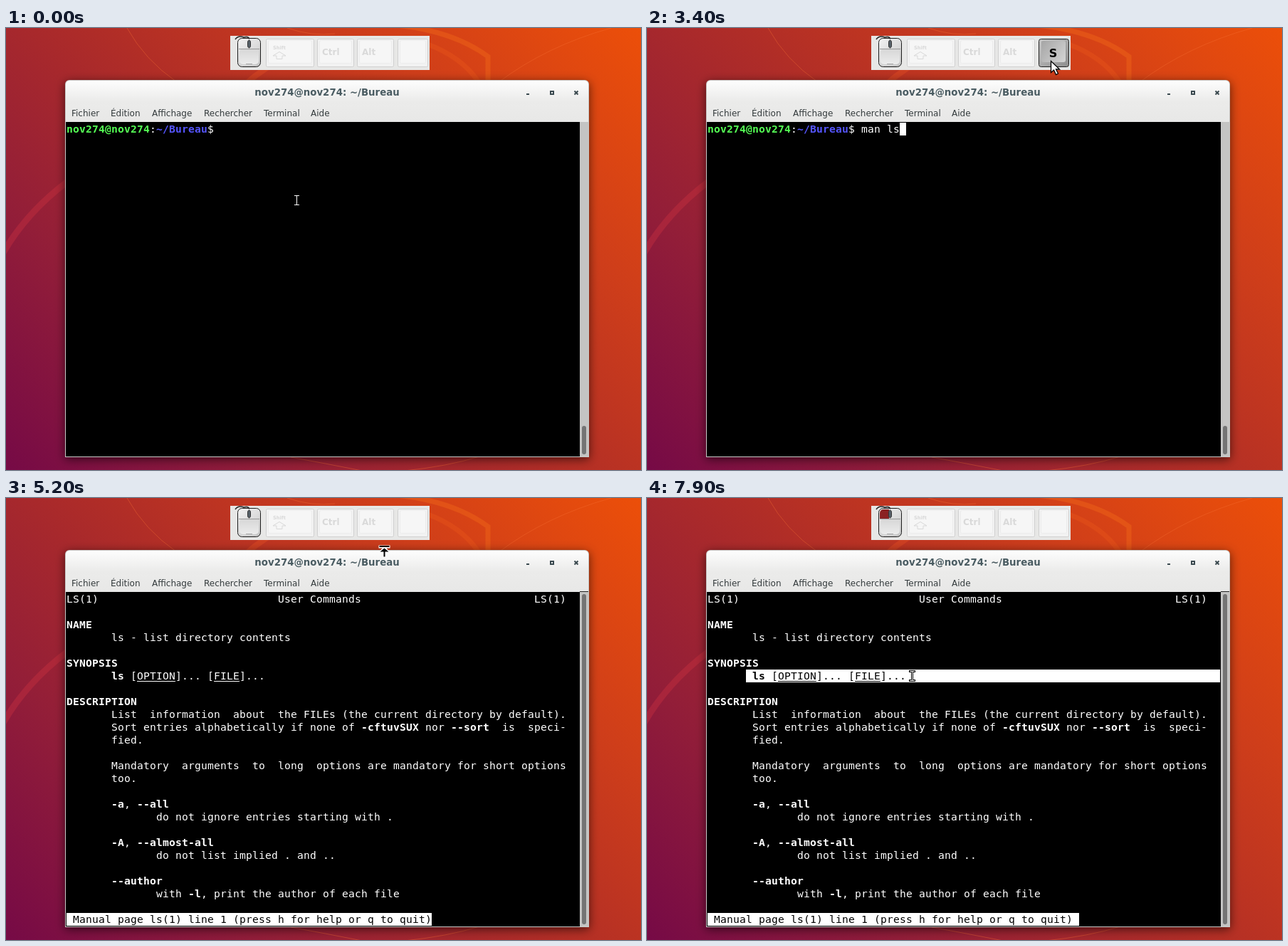
Recreate the animation shown at these times as an HTML page with a canvas. Size 892 px wide and 621 px high, loop 8 s.

```html
<!DOCTYPE html>
<html lang="fr">
<head>
<meta charset="utf-8">
<title>Terminal</title>
<style>
  html, body { margin: 0; width: 100%; height: 100%; overflow: hidden; }
  canvas { display: block; }
</style>
</head>
<body>
<canvas id="stage" width="892" height="621"></canvas>
<script>
const ctx = document.getElementById('stage').getContext('2d');
const LOOP = 8000, STEP = 100;
const SANS = '"DejaVu Sans", sans-serif', MONO = '"DejaVu Sans Mono", monospace';
const USER = 'nov274';
const LEFT = 85, TOP = 133, CELL_W = 9, CELL_H = 18;

// *bold* and _underlined_
const PAGE = `LS(1)${' '.repeat(28)}User Commands${' '.repeat(27)}LS(1)

*NAME*
       ls - list directory contents

*SYNOPSIS*
       *ls* [_OPTION_]... [_FILE_]...

*DESCRIPTION*
       List  information  about  the FILEs (the current directory by default).
       Sort entries alphabetically if none of *-cftuvSUX* nor *--sort*  is  speci-
       fied.

       Mandatory  arguments  to  long  options are mandatory for short options
       too.

       *-a*, *--all*
              do not ignore entries starting with .

       *-A*, *--almost-all*
              do not list implied . and ..

       *--author*
              with *-l*, print the author of each file`.split('\n');
const STATUS = ' Manual page ls(1) line 1 (press h for help or q to quit)';

// [time, value]: each value holds until the next entry
const KEYS = [[0, ''], [1700, 'M'], [1800, 'A'], [2000, 'N'], [2300, 'Space'], [2900, ''],
  [3200, 'L'], [3400, 'S'], [4100, 'Enter'], [4700, '']];
const TYPED = [[0, ''], [1700, 'm'], [1800, 'ma'], [2100, 'man'], [2300, 'man '],
  [3200, 'man l'], [3400, 'man ls']];
const CARET = [[0, 0], [400, 1], [1000, 0], [1600, 1], [2900, 0], [3200, 1], [4000, 0], [4100, 1],
  [4700, 0], [5300, 1], [5900, 0], [6500, 1], [7200, 0], [7800, 1]];
// [time, x, y], linear in between
const POINTER = [[600, 408, 242], [700, 470, 200], [800, 598, 110], [900, 585, 57], [1000, 567, 46],
  [4900, 567, 46], [5200, 531, 69], [5300, 516, 95], [5600, 302, 265], [5800, 346, 310],
  [6100, 338, 282], [6300, 338, 282], [6600, 176, 250], [6700, 161, 247], [6800, 161, 247],
  [6900, 138, 249], [7400, 138, 249], [7500, 155, 249], [7800, 340, 250], [7900, 372, 250]];

const valueAt = (list, t) => list.filter(e => e[0] <= t).pop()[1];

function pointerAt(t) {
  const i = POINTER.findIndex(p => p[0] > t);
  if (i <= 0) return POINTER[i < 0 ? POINTER.length - 1 : 0].slice(1);
  const [t0, x0, y0] = POINTER[i - 1], [t1, x1, y1] = POINTER[i];
  const k = (t - t0) / (t1 - t0);
  return [Math.round(x0 + (x1 - x0) * k), Math.round(y0 + (y1 - y0) * k)];
}

function rect(x, y, w, h, color) {
  ctx.fillStyle = color;
  ctx.fillRect(x, y, w, h);
}

function box(x, y, w, h, r, fill, stroke) {
  ctx.beginPath();
  ctx.roundRect(x, y, w, h, r);
  paint(fill, stroke);
}

function shape(d, fill, stroke, width = 1) {
  paint(fill, stroke, width, new Path2D(d));
}

function paint(fill, stroke, width = 1, path) {
  ctx.lineWidth = width;
  if (fill) { ctx.fillStyle = fill; path ? ctx.fill(path) : ctx.fill(); }
  if (stroke) { ctx.strokeStyle = stroke; path ? ctx.stroke(path) : ctx.stroke(); }
}

function label(text, x, y, font, color, align = 'left') {
  ctx.font = font;
  ctx.fillStyle = color;
  ctx.textAlign = align;
  ctx.fillText(text, x, y);
}

function gradient(x0, y0, x1, y1, ...stops) {
  const g = ctx.createLinearGradient(x0, y0, x1, y1);
  stops.forEach((c, i) => g.addColorStop(i / (stops.length - 1), c));
  return g;
}

function wallpaper() {
  rect(0, 0, 892, 621, gradient(68, 688, 824, -68, '#760a46', '#931e38', '#b02d27', '#cf3e1a', '#ec4f09'));
  shape('M-4 316Q28 260 86 216', null, 'rgba(215,55,65,.32)', 9);
  shape('M335 80Q362 55 400 38', null, 'rgba(235,85,35,.35)', 8);
  shape('M520 -6Q620 -2 677 40V76', null, 'rgba(240,105,25,.42)', 7);
  shape('M590 22Q640 40 664 76', null, 'rgba(240,95,25,.28)', 7);
  shape('M170 0Q195 45 240 76M395 0Q430 12 462 8M692 76Q760 25 850 0M400 603Q450 612 500 622M560 622Q620 616 665 602',
    null, 'rgba(245,110,50,.4)');
}

function key(x, w, pressed) {
  if (pressed) {
    box(x + .5, 15.5, w, 39, 3, gradient(x, 15, x + w, 55, '#c6c6c6', '#8e8e8e'), '#222');
    box(x + 4, 18, w - 8, 30, 3, gradient(x, 18, x + w, 48, '#a2a2a2', '#d8d8d8'));
  } else {
    box(x + .5, 15.5, w, 39, 2, '#f2f2f2', '#d0d0d0');
    box(x + 3.5, 17.5, w - 6, 32, 2, '#f6f6f6', '#ececec');
  }
}

function keyPanel(name, mouseDown) {
  const wide = name.length > 1, faded = '#d9d9d9';
  rect(315, 11, wide ? 304 : 280, 48, '#e7e7e6');

  shape('M322 16Q326 10 334 13Q341 11 342 16', null, '#222', 1.5);
  box(325.5, 14.5, 32, 40, 6, gradient(325, 14, 358, 55, '#f4f4f4', '#c2c2c2'), '#1c1c1c');
  box(328, 29, 27, 22, 5, gradient(0, 29, 0, 51, '#d6d6d6', '#ececec'));
  if (mouseDown) box(327, 16, 13, 13, [5, 0, 0, 0], '#8a2222');
  shape('M327 29.5H356M341.5 15V29', null, '#999');
  box(339.5, 17.5, 4, 10, 2, '#58626a', '#333');
  rect(337, 50, 9, 1, '#aaa');

  key(365, 67);
  key(437, 51);
  key(493, 51);
  label('Shift', 375, 30, 'bold 6.7px ' + SANS, faded);
  shape('M375 39L384 33.5L393 39H388V43.5H380V39Z', null, faded);
  label('Ctrl', 444, 38, 'bold 12px ' + SANS, faded);
  label('Alt', 500, 38, 'bold 12px ' + SANS, faded);

  key(wide ? 549 : 550, wide ? 67 : 42, name);
  if (!wide) return label(name, 570.5, 40.5, 'bold 16px ' + SANS, '#000', 'center');
  label(name, 558, 30, 'bold 8.5px ' + SANS, '#000');
  if (name === 'Enter')
    shape('M558 38L563 34.5V36.5H572.5V33.5H575.5V39.5H563V41.5Z', '#ddd', '#000');
}

function windowFrame(fullThumb) {
  ctx.save();
  ctx.shadowColor = 'rgba(0,0,0,.6)';
  ctx.shadowBlur = 14;
  ctx.shadowOffsetY = 3;
  box(83, 73, 736, 530, [6, 6, 0, 0], '#c9c9c7');
  ctx.restore();
  box(84, 74, 734, 58, [5, 5, 0, 0], gradient(0, 74, 0, 132, '#fdfdfd', '#ebebea', '#e8e8e7'));
  label(`${USER}@${USER}: ~/Bureau`, 451, 95, 'bold 13.33px ' + SANS, '#4a5c62', 'center');
  rect(731, 92, 4, 2, '#3b4a50');
  shape('M765 89H769V93H765Z', null, '#3b4a50', 2);
  shape('M798.5 88.5L803.5 93.5M803.5 88.5L798.5 93.5', null, '#3b4a50', 2);
  const menu = { Fichier: 92, Édition: 147, Affichage: 205, Rechercher: 278, Terminal: 362, Aide: 428 };
  for (const item in menu) label(item, menu[item], 124, '12px ' + SANS, '#333a3c');

  rect(84, 132, 722, 470, '#000');
  rect(806, 132, 12, 470, '#c4c4c3');
  if (fullThumb) rect(806, 131, 12, 1, '#222');
  const y = fullThumb ? 135 : 559;
  box(809, y, 6, 599 - y, 3, '#747474');
}

// Writes marked-up text on the character grid and returns the next column
function write(text, col, row, color = '#fff', bold = false) {
  let underline = false;
  const y = TOP + row * CELL_H + 14;
  for (const ch of text) {
    if (ch === '*') { bold = !bold; continue; }
    if (ch === '_') { underline = !underline; continue; }
    const x = LEFT + col++ * CELL_W;
    if (ch !== ' ') label(ch, x, y, `${bold ? 'bold ' : ''}14.667px ${MONO}`, color);
    if (underline) rect(x, y + 2, CELL_W, 1, color);
  }
  return col;
}

function caret(col, row, on) {
  if (on) rect(LEFT + col * CELL_W, TOP + row * CELL_H, CELL_W, CELL_H, '#fff');
}

function shell(t) {
  let col = write(`${USER}@${USER}`, 0, 0, '#55ff55', true);
  col = write(':', col, 0);
  col = write('~/Bureau', col, 0, '#5555ff', true);
  col = write('$ ' + valueAt(TYPED, t), col, 0);
  t < 4100 ? caret(col, 0, valueAt(CARET, t)) : caret(0, 1, true);
}

function manual(t, pointerX) {
  PAGE.forEach((line, row) => write(line, 0, row));
  rect(LEFT, 583, STATUS.length * CELL_W, CELL_H, '#fff');
  write(STATUS, 0, 25, '#000');
  caret(STATUS.length, 25, valueAt(CARET, t));
  if (t < 7500) return;

  // Past the end of the text the selection runs to the edge
  const cols = Math.round((pointerX - LEFT) / CELL_W);
  const right = cols > 30 ? 805 : LEFT + cols * CELL_W;
  ctx.save();
  ctx.beginPath();
  ctx.rect(139, 241, right - 139, CELL_H);
  ctx.clip();
  rect(139, 241, 666, CELL_H, '#fff');
  write(PAGE[6], 0, 6, '#000');
  ctx.restore();
}

function pointer(x, y) {
  ctx.save();
  ctx.translate(x + .5, y + .5);
  if (y > 131) {
    const beam = 'M-3 -7H3M0 -7V6M-3 6H3';
    ctx.lineCap = 'square';
    shape(beam, null, '#000', 3);
    shape(beam, null, '#fff');
  } else if (y > 60 && y < 75) {
    shape('M-8 -3H8V1H3L8 7H2V14H-2V7H-8L-3 1H-8Z', '#fff');
    shape('M-7 -1.5H7', null, '#000', 2);
    shape('M0 1L6 6H1V13H-1V6H-6Z', '#000');
  } else {
    shape('M0 0V16L4 12.5L7 19L10 17.5L7 11.5H12Z', '#fff', '#000', 1.3);
  }
  ctx.restore();
}

function draw(t) {
  const [x, y] = pointerAt(t);
  wallpaper();
  keyPanel(valueAt(KEYS, t), t >= 7400);
  windowFrame(t >= 4300);
  t < 4200 ? shell(t) : manual(t, x);
  pointer(x, y);
}

let shown = -1;
function tick() {
  const t = Math.floor(performance.now() % LOOP / STEP) * STEP;
  if (t !== shown) draw(shown = t);
  requestAnimationFrame(tick);
}
tick();
</script>
</body>
</html>
```
